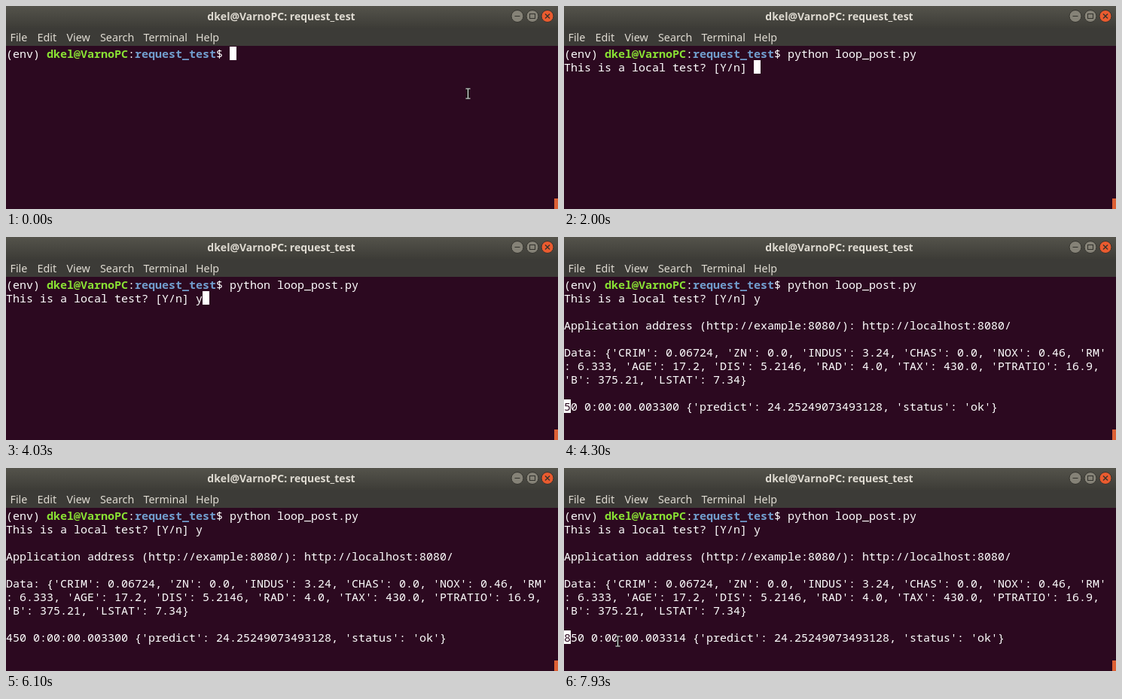
An HTML page for the animation above (8 s loop, 733 by 270 pixels).

```html
<!DOCTYPE html>
<html lang="en">
<head>
<meta charset="utf-8">
<title>Terminal</title>
<style>
  html, body { margin: 0; width: 100%; height: 100%; overflow: hidden; background: #2c0920; }
  svg { display: block; }
  text { white-space: pre; }
  .ui { font: 14.3px "Noto Sans", "Open Sans", sans-serif; fill: #dfdbd2; }
  .title { font-size: 14px; font-weight: 600; text-anchor: middle; }
  .term { font: 15px "Noto Sans Mono", "DejaVu Sans Mono", monospace; fill: #fff; }
  .user { fill: #8ae234; font-weight: 700; }
  .path { fill: #729fcf; font-weight: 700; }
</style>
</head>
<body>
<svg width="733" height="270" viewBox="0 0 733 270">
  <defs>
    <linearGradient id="bar" x2="0" y2="1">
      <stop offset="0" stop-color="#54534b"/>
      <stop offset="1" stop-color="#3d3c37"/>
    </linearGradient>
  </defs>
  <rect width="733" height="270" fill="#2c0920"/>
  <rect width="733" height="53" fill="#3c3b37"/>
  <rect width="733" height="29" fill="url(#bar)"/>
  <text class="ui title" x="365.5" y="19">dkel@VarnoPC: request_test</text>
  <g stroke="#33322d">
    <circle cx="679" cy="13.5" r="8" fill="#858277"/>
    <circle cx="699" cy="13.5" r="8" fill="#858277"/>
    <circle cx="719" cy="13.5" r="8" fill="#ea5b2f"/>
  </g>
  <g fill="none" stroke="#33322d">
    <path d="M675.5 13.5h7"/>
    <rect x="695.5" y="10.5" width="7" height="6"/>
    <path d="M716 10.5l6 6m0-6l-6 6" stroke-width="1.3"/>
  </g>
  <g class="ui" id="menu"></g>
  <rect x="728" y="256" width="5" height="14" fill="#dd6035"/>
  <g class="term" id="screen"></g>
  <rect id="block" width="9" height="18" fill="#fff"/>
  <text class="term" id="under" style="fill:#2c0920"></text>
  <g id="beam" fill="none">
    <path d="M-2.5-6.5h5M-2.5 6.5h5M0-6.5v13" stroke="#111" stroke-width="3"/>
    <path d="M-3-6.5h6M-3 6.5h6M0-6v12" stroke="#fff"/>
  </g>
</svg>
<script>
const LOOP = 8000, CELL = 9, ROW = 18, TOP = 54, BLINK = 615;
const RUN = 4300, BATCH = 222;
const $ = id => document.getElementById(id);
const rowY = row => TOP + row * ROW;

function addText(parent, x, y) {
  const el = document.createElementNS('http://www.w3.org/2000/svg', 'text');
  el.setAttribute('x', x);
  el.setAttribute('y', y);
  return parent.appendChild(el);
}

function show(el, visible) {
  el.style.display = visible ? '' : 'none';
}

const menu = { File: 5.5, Edit: 41.5, View: 80.5, Search: 125, Terminal: 182.5, Help: 252 };
for (const name in menu) addText($('menu'), menu[name], 47).textContent = name;

const lines = Array.from({ length: 10 }, (_, row) => addText($('screen'), 0, rowY(row) + 15));
lines[0].innerHTML = '(env) <tspan class="user">dkel@VarnoPC</tspan>:' +
  '<tspan class="path">request_test</tspan>$ <tspan id="command"></tspan>';
$('under').setAttribute('y', rowY(9) + 15);

const question = 'This is a local test? [Y/n] ';
const output = `
Application address (http://example:8080/): http://localhost:8080/

Data: {'CRIM': 0.06724, 'ZN': 0.0, 'INDUS': 3.24, 'CHAS': 0.0, 'NOX': 0.46, 'RM'
: 6.333, 'AGE': 17.2, 'DIS': 5.2146, 'RAD': 4.0, 'TAX': 430.0, 'PTRATIO': 16.9,
'B': 375.21, 'LSTAT': 7.34}`.split('\n');

// Session states; blink is the time the cursor last turned on.
const steps = [
  { at: 0, col: 33, row: 0, blink: 70 - BLINK },
  { at: 570, col: 33, row: 0, blink: 570 },
  { at: 1000, col: 52, row: 0, blink: 570, command: 'python loop_post.py' },
  { at: 1970, col: 0, row: 1 },
  { at: 2000, col: 28, row: 1, reply: question },
  { at: 3500, col: 29, row: 1, blink: 3500, reply: question + 'n' },
  { at: 3870, col: 28, row: 1, blink: 3870 - BLINK, reply: question },
  { at: 4030, col: 29, row: 1, blink: 4030, reply: question + 'y' },
  { at: RUN, col: 0, row: 9 }
];
steps.forEach((step, i) => { steps[i] = { command: '', reply: '', ...steps[i - 1], ...step }; });

// Pointer key points [time, x, y]; hidden outside each path.
const paths = [
  [[0, 613, 116], [570, 613, 116]],
  [[5170, 613, 116], [5430, 385, 121], [5900, 385, 121]],
  [[6560, 150, 259], [6970, 152, 257], [7400, 100, 243], [7930, 71, 230], [LOOP, 71, 230]]
];

function pointer(t) {
  const path = paths.find(p => t >= p[0][0] && t < p[p.length - 1][0]);
  if (!path) return null;
  const i = path.findIndex(p => p[0] > t);
  const [t0, x0, y0] = path[i - 1], [t1, x1, y1] = path[i];
  const k = (t - t0) / (t1 - t0);
  return [x0 + (x1 - x0) * k, y0 + (y1 - y0) * k].map(v => Math.round(v) + .5);
}

// Every batch adds 50 requests; the mean response time drifts slowly.
function statusLine(t) {
  const n = Math.floor((t - RUN) / BATCH) + 1;
  const micros = Math.round(3304 - 12.8 * Math.cos((n - 4.9) * Math.PI / 10));
  return `${n * 50} 0:00:00.00${micros} {'predict': 24.25249073493128, 'status': 'ok'}`;
}

function render(t) {
  const step = steps.filter(s => s.at <= t).pop();
  const running = t >= RUN;
  const status = running ? statusLine(t) : '';
  $('command').textContent = step.command;
  lines[1].textContent = step.reply;
  output.forEach((text, i) => { lines[i + 2].textContent = running ? text : ''; });
  lines[9].textContent = status;

  const on = Math.floor((t - step.blink) / BLINK) % 2 === 0;
  $('block').setAttribute('x', step.col * CELL);
  $('block').setAttribute('y', rowY(step.row));
  show($('block'), on);
  $('under').textContent = on ? status.charAt(0) : '';

  const at = pointer(t);
  show($('beam'), at);
  if (at) $('beam').setAttribute('transform', `translate(${at})`);
}

const start = performance.now();
function frame() {
  render((performance.now() - start) % LOOP);
  requestAnimationFrame(frame);
}
render(0);
requestAnimationFrame(frame);
</script>
</body>
</html>
```
